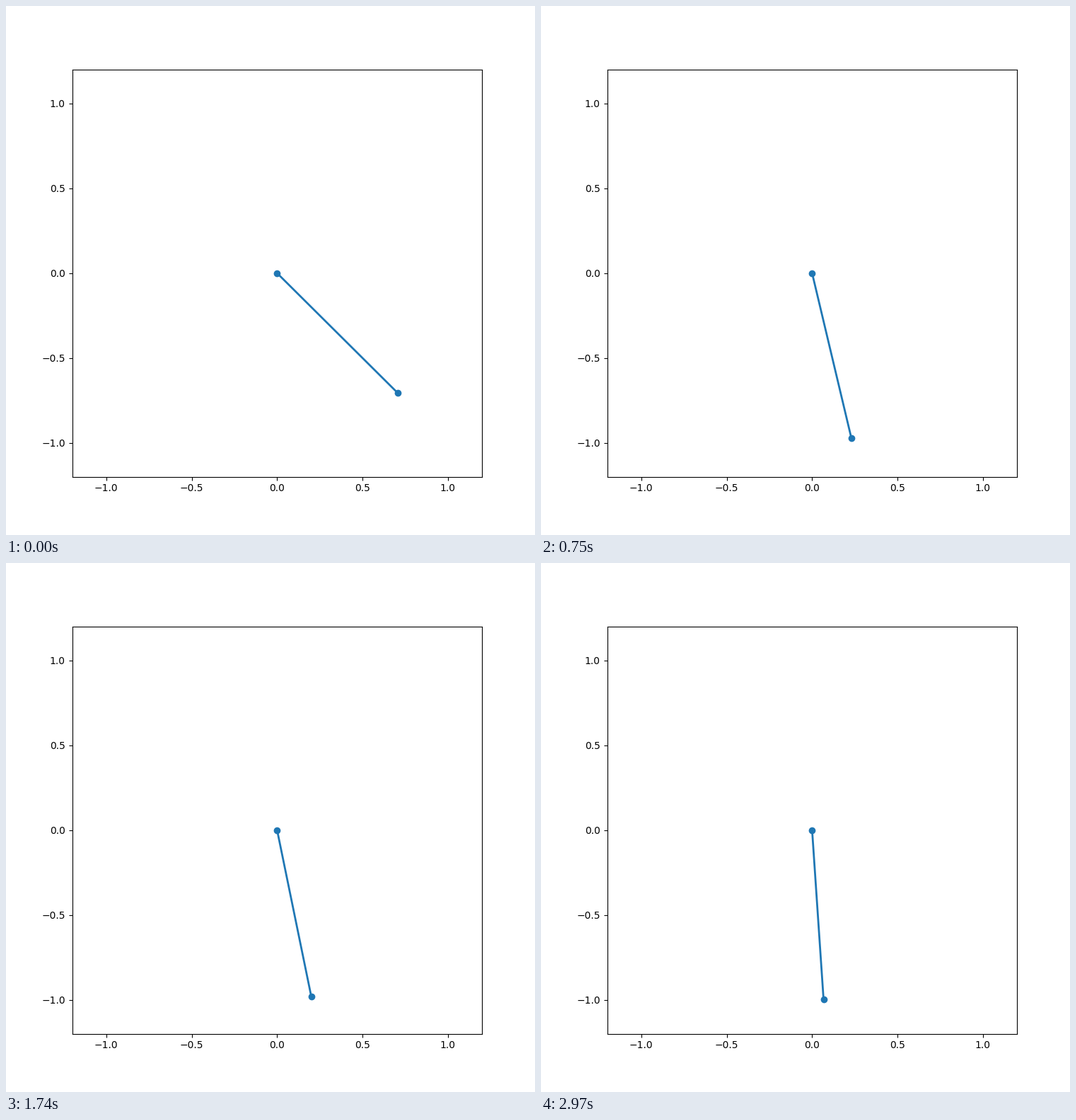
Animation of 748x748 px, one loop 3 s. Source, as a matplotlib script:

```python
import numpy as np
import matplotlib.pyplot as plt
from matplotlib.animation import FuncAnimation

SIZE, DPI = 748, 100
FRAMES, INTERVAL = 100, 30
G, LENGTH, DT = 9.81, 1.0, 0.1


def swing(start, count):
    """Angles of a pendulum released from rest, by Verlet steps."""
    def kick(a):
        return -G / LENGTH * np.sin(a) * DT ** 2

    angles = [start, start + kick(start) / 2]
    while len(angles) < count:
        angles.append(2 * angles[-1] - angles[-2] + kick(angles[-1]))
    return np.array(angles)


theta = swing(np.pi / 4, FRAMES)

fig = plt.figure(figsize=(SIZE / DPI, SIZE / DPI), dpi=DPI, facecolor="white")
ax = fig.add_axes([0.125, 0.11, 0.775, 0.77])
ax.set_xlim(-1.2, 1.2)
ax.set_ylim(-1.2, 1.2)
ticks = np.linspace(-1, 1, 5)
ax.set_xticks(ticks)
ax.set_yticks(ticks)

rod, = ax.plot([], [], "o-", color="#1f77b4", lw=2)


def update(i):
    a = theta[i]
    rod.set_data([0, LENGTH * np.sin(a)], [0, -LENGTH * np.cos(a)])
    return rod,


anim = FuncAnimation(fig, update, frames=FRAMES, interval=INTERVAL,
                     repeat=True, repeat_delay=0, blit=False)
plt.show()
```
